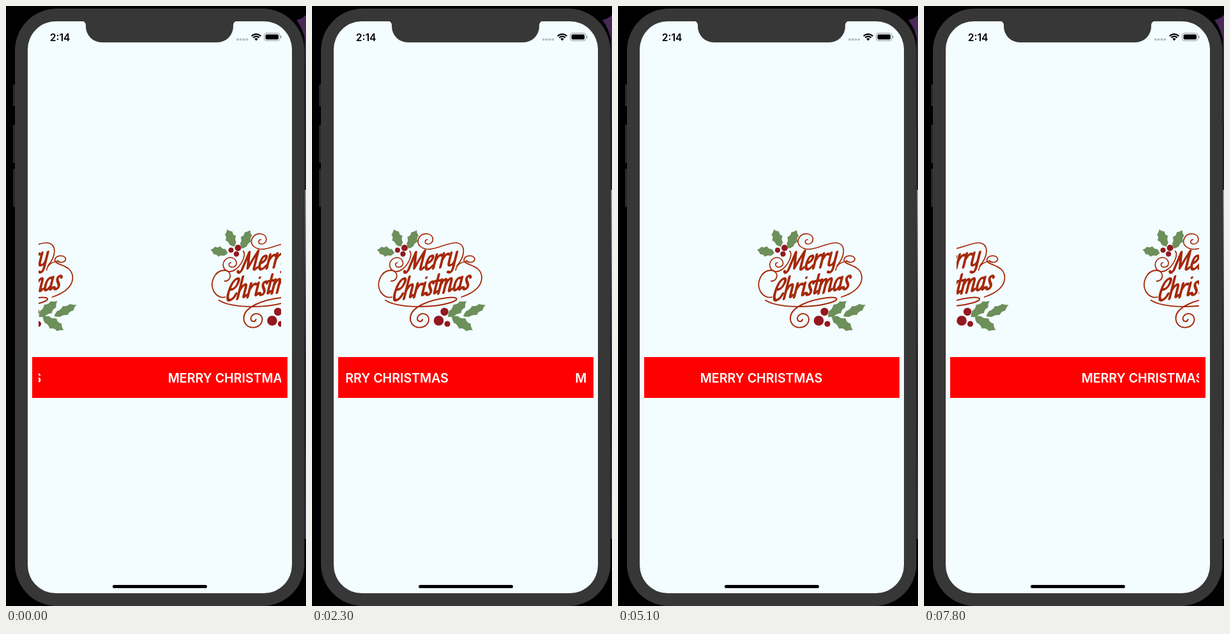
Animation, 470 px wide and 940 px high, one loop 7.9 s. Source, as an HTML page with a canvas:

```html
<!DOCTYPE html>
<html lang="en">
<head>
<meta charset="utf-8">
<title>Marquee</title>
<style>
html, body { margin: 0; width: 100%; height: 100%; overflow: hidden; background: #000; }
canvas { display: block; width: 470px; height: 940px; }
</style>
</head>
<body>
<canvas id="stage" width="470" height="940"></canvas>
<script>
const ctx = document.getElementById('stage').getContext('2d');
const LOOP = 7900, STEP = 100;
const INK = '#a62808', GREEN = '#6d8f5a', BERRY = '#931820', PAPER = '#f3fcff';
const FONT = 'Inter, "Liberation Sans", sans-serif';

// Unwrapped left edges of both marquees over time
const TIMES = [0, 1500, 2300, 3400, 5100, 6900, 7800];
const ART = { x: [320, 177.5, 101.5, 0.3, -162.5, -332, -418], period: 380 };
const LABEL = { x: [255, 103, 23.5, -86, -260, -441, -532], period: 390 };

function position(track, t) {
  let i = 1;
  while (i < TIMES.length - 1 && t > TIMES[i]) i++;
  const k = (t - TIMES[i - 1]) / (TIMES[i] - TIMES[i - 1]);
  const x = track.x[i - 1] + (track.x[i] - track.x[i - 1]) * k;
  return ((x % track.period) + track.period) % track.period;
}

function box(x, y, w, h, r, color) {
  ctx.fillStyle = color;
  ctx.beginPath();
  ctx.roundRect(x, y, w, h, r);
  ctx.fill();
}

function dot(x, y, r, color) {
  ctx.fillStyle = color;
  ctx.beginPath();
  ctx.arc(x, y, r, 0, Math.PI * 2);
  ctx.fill();
}

function gradient(x, y, w, h, colors) {
  const g = ctx.createLinearGradient(0, y, 0, y + h);
  colors.forEach((c, i) => g.addColorStop(i / (colors.length - 1), c));
  ctx.fillStyle = g;
  ctx.fillRect(x, y, w, h);
}

// Script letters as pen strokes: baseline at 0, y pointing down
const PEN = {
  C: 'M11-24C15-36 4-37 1-22C-2-4 2 1 6 0Q11-1 13-9M1-17Q9-16 11-24',
  M: 'M-2-3Q1 3 4-4L9-31Q11-18 13-5Q17-18 23-31V-4Q24 1 28-4',
  h: 'M0-35V0M0-12C3-22 9-25 9-17V-4Q9 1 13-4',
  r: 'M0-22V0M0-11Q4-23 9-19',
  i: 'M0-21V-4Q0 1 4-4M0-29v.1',
  s: 'M7-18C5-23 0-21 1-16S7-8 6-4S1 1-1-4',
  t: 'M0-31V-4Q0 1 4-4M-4-21H5',
  m: 'M0-22V0M0-12C2-22 8-25 8-17V0M8-12C10-22 16-25 16-17V-4Q16 1 20-4',
  a: 'M9-18C4-24 0-18 0-9S4 2 9-8M9-21V-4Q9 1 13-4',
  e: 'M1-10C9-12 10-21 5-21C0-21-1-8 1-3S8 0 11-5',
  y: 'M0-21V-7Q0 0 4-1T9-8M9-21V5Q8 13 2 9'
};
for (const k in PEN) PEN[k] = new Path2D(PEN[k]);

function script(word, x, y, offsets) {
  ctx.save();
  ctx.transform(1, -0.155, -0.25, 1, x, y);
  ctx.lineWidth = 4;
  [...word].forEach((c, i) => {
    ctx.save();
    ctx.translate(offsets[i], 0);
    ctx.stroke(PEN[c]);
    ctx.restore();
  });
  ctx.restore();
}

const SWIRLS = [
  [1.7, 'M257 366C252 366 252 373 258 373C267 373 269 359 257 357C244 355 238 370 245 376C260 390 285 370 302 371C318 373 316 392 303 407'],
  [1.7, 'M229 384C236 390 222 417 207 416C194 414 195 396 208 394C220 394 222 408 213 409C206 410 205 402 210 402'],
  [1.8, 'M200 431C212 431 212 414 199 414C184 415 176 434 183 447C187 454 194 458 201 456'],
  [1.8, 'M318 399C323 404 331 401 331 396C329 389 315 390 314 398C314 407 341 404 342 425C342 440 328 450 310 456'],
  [1.6, 'M301 414C303 404 310 401 318 400'],
  [2, 'M191 461C212 474 265 473 292 465C309 460 304 455 288 457C262 460 229 471 230 490C231 508 258 508 259 491C259 480 243 479 241 489C241 495 248 496 249 491']
].map(([width, d]) => [width, new Path2D(d)]);

// Spiky leaf from base to tip
function leaf(x0, y0, x1, y1, half) {
  const spikes = [[0.2, 0.65], [0.5, 1], [0.78, 0.72], [1, 0]];
  const len = Math.hypot(x1 - x0, y1 - y0);
  ctx.save();
  ctx.translate(x0, y0);
  ctx.rotate(Math.atan2(y1 - y0, x1 - x0));
  ctx.fillStyle = GREEN;
  ctx.beginPath();
  for (const side of [-1, 1]) {
    let prev = 0;
    ctx.moveTo(0, 0);
    for (const [p, w] of spikes) {
      const mid = (prev + p) / 2 - 0.02;
      const inner = p < 0.3 ? 0.4 : p < 1 ? 0.48 : 0.2;
      ctx.quadraticCurveTo(mid * len, side * half * inner, p * len, side * half * w);
      prev = p;
    }
    ctx.lineTo(0, 0);
  }
  ctx.fill();
  ctx.restore();
}

function greeting(left) {
  ctx.save();
  ctx.translate(left - 177.5, 0);
  leaf(215, 377, 204, 350, 9);
  leaf(227, 380, 240, 351, 9);
  leaf(205, 387, 178, 382, 8.5);
  leaf(289, 487, 318, 462, 9);
  leaf(313, 486, 348, 468, 8);
  leaf(295, 487, 328, 508, 9.5);
  ctx.strokeStyle = INK;
  ctx.lineCap = ctx.lineJoin = 'round';
  for (const [width, path] of SWIRLS) {
    ctx.lineWidth = width;
    ctx.stroke(path);
  }
  script('Merry', 222, 418, [0, 31, 44, 55, 67]);
  script('Christmas', 200, 462, [3, 20, 36, 48, 55, 67, 74, 97, 113]);
  dot(221, 379, 5, BERRY);
  dot(210, 382.5, 4, BERRY);
  dot(218.5, 388.5, 4.2, BERRY);
  dot(283.5, 479, 6.2, BERRY);
  dot(274.5, 493, 7.8, BERRY);
  dot(288, 498, 4.6, BERRY);
  ctx.restore();
}

function notch() {
  ctx.fillStyle = '#373737';
  ctx.beginPath();
  ctx.moveTo(118, 23);
  ctx.arcTo(125, 24, 125, 57, 7);
  ctx.arcTo(125, 57, 240, 57, 25);
  ctx.arcTo(356, 57, 356, 24, 25);
  ctx.arcTo(356, 24, 363, 23, 7);
  ctx.lineTo(363, 23);
  ctx.fill();
}

function statusBar() {
  ctx.fillStyle = '#000';
  ctx.font = '600 15.7px ' + FONT;
  ctx.textAlign = 'left';
  ctx.fillText('2:14', 68.7, 54.5);
  for (let i = 0; i < 4; i++) dot(362.8 + i * 4.8, 52.4, 2, '#b9c0c3');

  ctx.strokeStyle = '#000';
  ctx.lineCap = 'butt';
  ctx.lineWidth = 2.3;
  for (const r of [6.3, 9.9]) {
    ctx.beginPath();
    ctx.arc(392, 54, r, -Math.PI * 0.76, -Math.PI * 0.24);
    ctx.stroke();
  }
  ctx.fillStyle = '#000';
  ctx.beginPath();
  ctx.moveTo(392, 54.5);
  ctx.arc(392, 54, 3.6, -Math.PI * 0.76, -Math.PI * 0.24);
  ctx.fill();

  ctx.strokeStyle = '#93999b';
  ctx.lineWidth = 1;
  ctx.beginPath();
  ctx.roundRect(404.5, 42.5, 24.5, 12, 3.5);
  ctx.stroke();
  box(406.5, 44.5, 20.5, 8, 2, '#000');
  box(430, 46.5, 1.5, 4, 1, '#93999b');
}

function phone() {
  ctx.fillStyle = '#000';
  ctx.fillRect(0, 0, 470, 940);
  ctx.fillStyle = '#4a2857';
  ctx.fill(new Path2D('M455 22Q464 20 470 14V60Q466 36 455 22Z'));
  gradient(468, 40, 2, 145, ['#4a2857', '#35204f', '#272350']);
  gradient(468, 288, 2, 547, ['#78969c', '#596a89', '#403e69', '#202b46', '#29243d', '#27384a', '#40316a']);
  box(466, 185, 5, 103, 1, '#202020');
  for (const [y, h] of [[123, 34], [186, 60], [255, 60]]) box(11, y, 6, h, 1.5, '#292929');
  box(14, 4, 453.5, 936, 66, '#373737');
  box(34, 24, 414, 896, 44, PAPER);
  notch();
  statusBar();
  box(167, 907, 148, 5, 2.5, '#000');
}

function draw(now) {
  const t = Math.floor((now % LOOP) / STEP) * STEP;
  phone();
  box(41, 550, 400, 64, 0, '#ff0000');
  ctx.save();
  ctx.beginPath();
  ctx.rect(51, 340, 380, 280);
  ctx.clip();
  const art = position(ART, t), label = position(LABEL, t);
  for (const n of [-1, 0, 1]) {
    greeting(art + n * ART.period);
    ctx.font = '600 19.6px ' + FONT;
    ctx.fillStyle = '#fff';
    ctx.fillText('MERRY CHRISTMAS', label + n * LABEL.period - 1.2, 589.5);
  }
  ctx.restore();
  requestAnimationFrame(draw);
}
requestAnimationFrame(draw);
</script>
</body>
</html>
```
